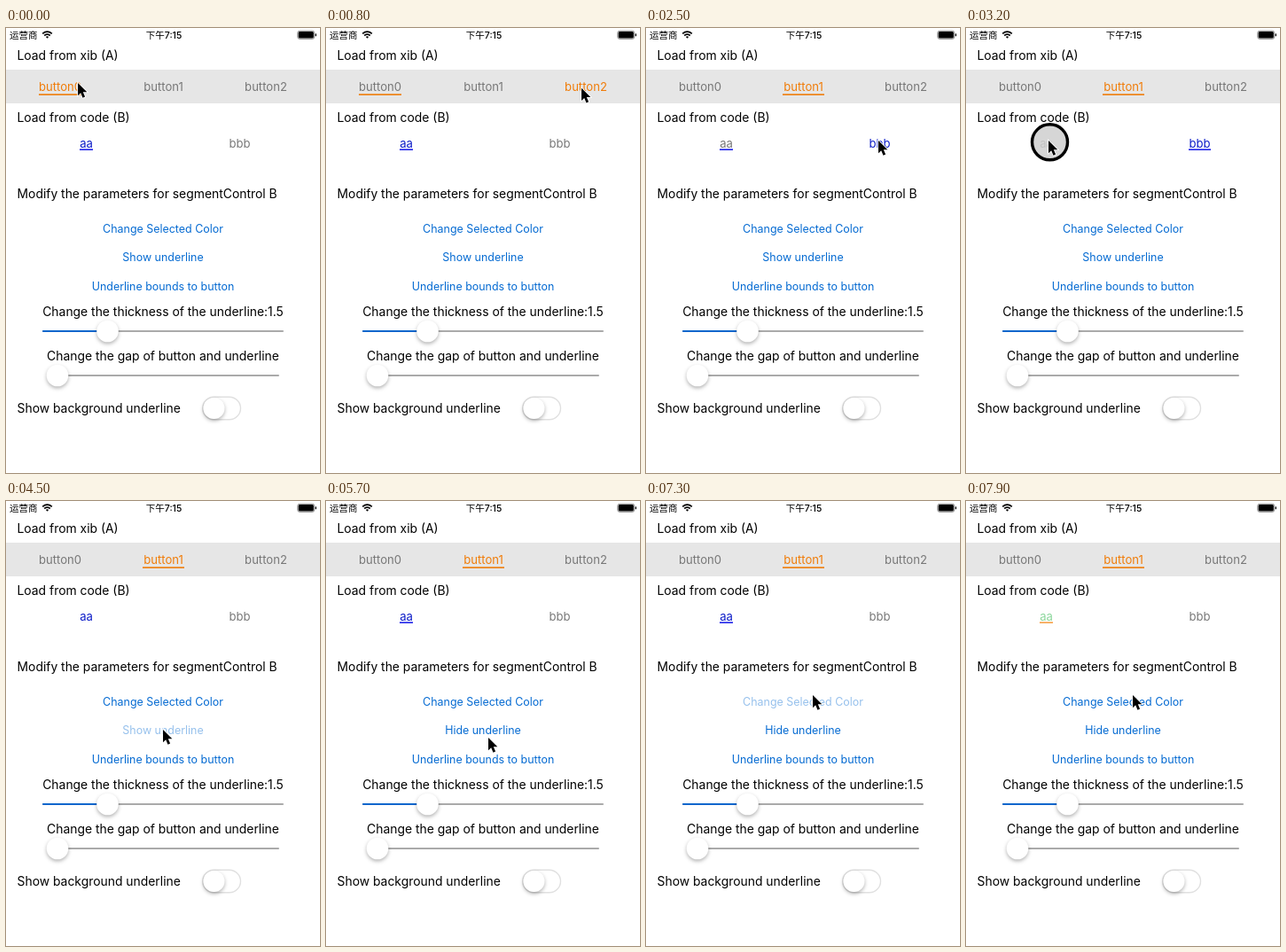
Animation of 354x502 px, one loop 8000 ms. Source, as an HTML page:

```html
<!DOCTYPE html>
<html lang="en">
<head>
<meta charset="utf-8">
<title>Segment control demo</title>
<style>
  html, body { margin: 0; width: 100%; height: 100%; overflow: hidden; background: #fff; }
  svg { display: block; width: 354px; height: 502px; }
  text { font-family: Inter, Roboto, sans-serif; font-size: 13.9px; fill: #000; }
  .status text { font-family: Inter, "Noto Sans CJK SC", "Noto Sans CJK", sans-serif; font-size: 10.5px; }
  .status .mid { font-weight: 500; }
  .mid { text-anchor: middle; }
  .seg text { font-size: 13.1px; text-anchor: middle; }
  .link text { font-size: 12.45px; text-anchor: middle; fill: #066bd2; }
  .thumb { fill: #fff; filter: drop-shadow(0 2px 2px rgba(0, 0, 0, .3)); }
</style>
</head>
<body>
<svg viewBox="0 0 354 502">
  <rect width="354" height="502" fill="#fff"/>
  <g class="status">
    <text x="4" y="11.7">运营商</text>
    <g fill="none" stroke="#000" stroke-width="1.7">
      <path d="M41.2 6.3Q46.5 1.8 51.8 6.3M43.2 8.5Q46.5 5.7 49.8 8.5"/>
      <path d="M46.5 11.8L44.9 9.9Q46.5 8.7 48.1 9.9Z" fill="#000" stroke="none"/>
    </g>
    <text class="mid" x="178" y="11.7">下午7:15</text>
    <rect x="328.7" y="3.2" width="19" height="9.2" rx="2.4" fill="none" stroke="#777" stroke-width=".8"/>
    <rect x="329.6" y="4.1" width="17.2" height="7.4" rx="1.5"/>
    <rect x="348.6" y="6.3" width="1.3" height="3" rx=".6"/>
  </g>

  <text x="12.5" y="36">Load from xib (A)</text>
  <rect y="47" width="354" height="38" fill="#e6e6e6"/>
  <g class="seg" id="segA">
    <text x="61" y="71">button0</text>
    <text x="177.5" y="71">button1</text>
    <text x="293" y="71">button2</text>
    <rect y="74.3" height="1.6"/>
  </g>

  <text x="12.5" y="106">Load from code (B)</text>
  <g class="seg" id="segB">
    <text x="90.5" y="134.7">aa</text>
    <text x="263.5" y="134.7">bbb</text>
    <rect y="136.4" height="1.5"/>
  </g>

  <text x="12.5" y="192.3">Modify the parameters for segmentControl B</text>
  <g class="link">
    <text id="colorLink" x="177" y="230.7">Change Selected Color</text>
    <text id="lineLink" x="177" y="263">Show underline</text>
    <text x="177" y="296">Underline bounds to button</text>
  </g>

  <text class="mid" x="177" y="325">Change the thickness of the underline:1.5</text>
  <rect x="41" y="341" width="272" height="2" rx="1" fill="#aaa"/>
  <rect x="41" y="341" width="74" height="2" rx="1" fill="#0c66cc"/>
  <circle class="thumb" cx="114.5" cy="342" r="12.3"/>

  <text class="mid" x="177" y="375">Change the gap of button and underline</text>
  <rect x="46" y="391" width="262" height="2" rx="1" fill="#aaa"/>
  <circle class="thumb" cx="58" cy="392" r="12.3"/>

  <text x="12.5" y="434">Show background underline</text>
  <rect x="221.7" y="416.2" width="42.8" height="25.6" rx="12.8" fill="#fff" stroke="#e0e0e0" stroke-width="1.4"/>
  <circle class="thumb" cx="234.5" cy="429" r="12"/>

  <g id="pointer">
    <circle id="ring" cx="1.5" cy="1.8" r="20" fill="rgba(208,208,208,.86)" stroke="#000" stroke-width="3.4"/>
    <path d="M0 0V14.2L3.2 11.2L5.5 16.7L8.1 15.6L5.8 10.3H10.3Z" stroke="#fff" stroke-width="1.6" paint-order="stroke"/>
  </g>
</svg>
<script>
const LOOP = 8000, STEP = 100, SLIDE = 300;
const GRAY = '#777', ORANGE = '#f07c08', BLUE = '#0c1cc8', GREEN = '#8bd79c';
const $ = id => document.getElementById(id);

// time, x, y of the pointer tip
const path = [
  [0, 81, 62], [100, 88, 62], [500, 288, 66], [900, 288, 68],
  [1150, 166, 80], [1400, 165, 81], [1600, 165, 92], [1800, 172, 102],
  [2200, 262, 127], [2600, 262, 127], [3000, 93, 127], [3400, 93, 127],
  [4000, 177, 258], [4800, 177, 258], [5000, 183, 262], [5400, 183, 262],
  [5600, 183, 267], [5900, 183, 267], [6500, 188, 219], [8000, 188, 219]
];
const presses = [[600, 800], [1200, 1400], [2300, 2500], [3100, 3300], [4200, 4400], [5100, 5300], [7100, 7300]];

// slots: [left, width]; picks: [time, index]
const segments = [
  { el: $('segA'), slots: [[37, 48], [154, 47], [269, 48]], picks: [[-999, 0], [800, 2], [1340, 1]] },
  { el: $('segB'), slots: [[83, 15], [251, 25]], picks: [[-999, 0], [2500, 1], [3300, 0]] }
];

const mix = (a, b, k) => a + (b - a) * k;
const ease = k => k * k * (3 - 2 * k);
const within = (t, [from, to]) => t >= from && t < to;

function pointerAt(t) {
  const i = path.findIndex(p => p[0] > t);
  const [t0, x0, y0] = path[i - 1], [t1, x1, y1] = path[i];
  const k = ease((t - t0) / (t1 - t0));
  return [mix(x0, x1, k), mix(y0, y1, k)];
}

function drawSegment({ el, slots, picks }, t, textColor, lineColor) {
  const n = picks.filter(p => p[0] <= t).length - 1;
  const [start, now] = picks[n];
  const before = picks[Math.max(0, n - 1)][1];
  const k = ease(Math.min(1, (t - start) / SLIDE));
  const line = el.querySelector('rect');
  line.setAttribute('x', mix(slots[before][0], slots[now][0], k));
  line.setAttribute('width', mix(slots[before][1], slots[now][1], k));
  line.style.fill = lineColor;
  el.querySelectorAll('text').forEach((label, i) => {
    label.style.fill = i === now ? textColor : GRAY;
  });
}

function draw(t) {
  const recolored = t >= 7400;
  drawSegment(segments[0], t, ORANGE, ORANGE);
  drawSegment(segments[1], t, recolored ? GREEN : BLUE, recolored ? '#f79a3a' : '#1014e8');
  segments[1].el.querySelector('rect').style.opacity = within(t, [4400, 5300]) ? 0 : 1;

  $('lineLink').textContent = t < 5400 ? 'Show underline' : 'Hide underline';
  $('lineLink').style.opacity = within(t, [4200, 4600]) || within(t, [5100, 5400]) ? .42 : 1;
  $('colorLink').style.opacity = within(t, [7100, 7400]) ? .42 : 1;

  $('pointer').setAttribute('transform', `translate(${pointerAt(t)})`);
  $('ring').style.display = presses.some(p => within(t, p)) ? '' : 'none';
}

const begin = performance.now();
function tick() {
  const t = (performance.now() - begin) % LOOP;
  draw(Math.floor(t / STEP) * STEP);
  requestAnimationFrame(tick);
}
tick();
</script>
</body>
</html>
```
